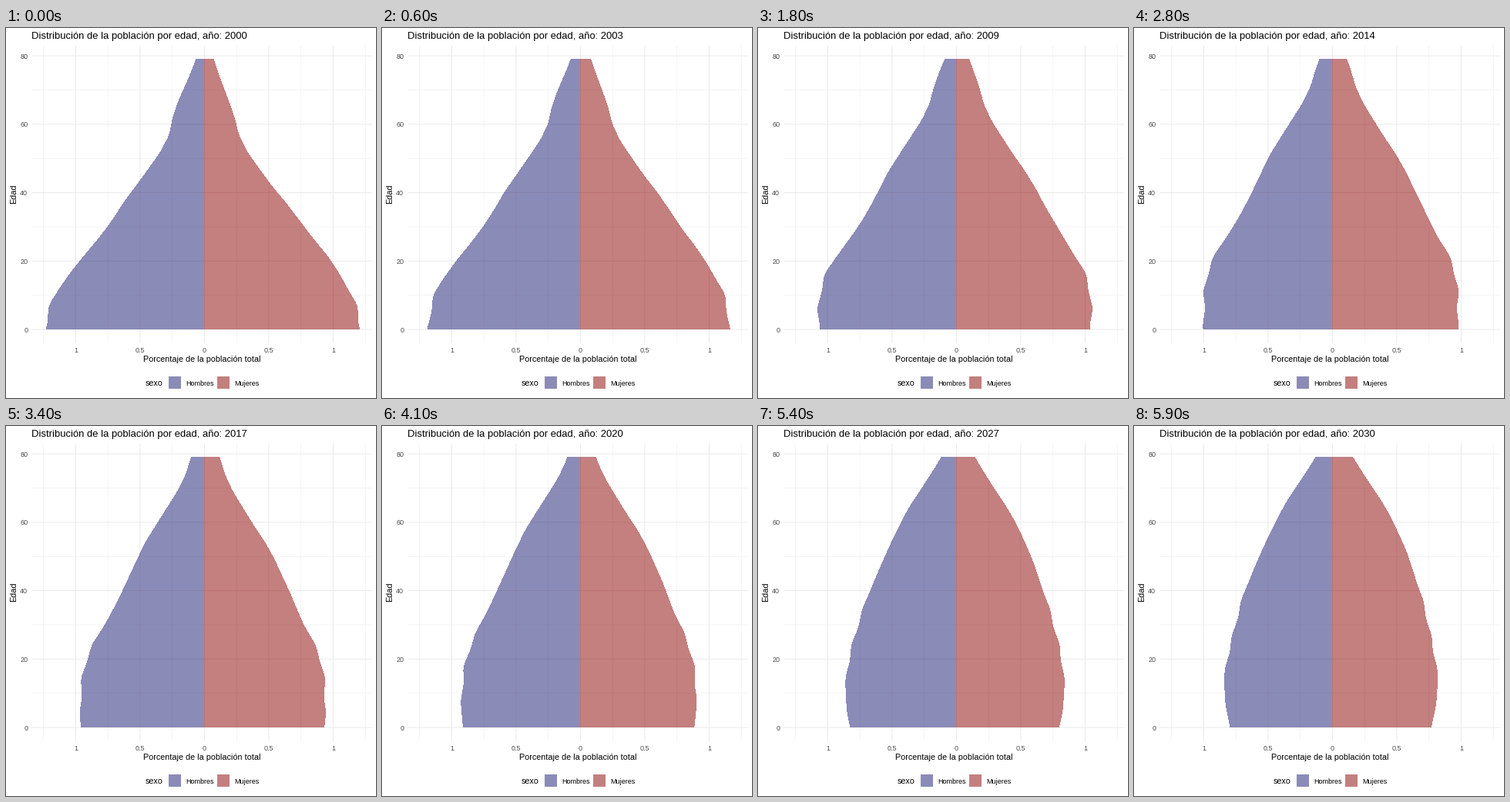
Animation, 480 px wide and 480 px high, one loop 6 s. Source, as a matplotlib script:

```python
import matplotlib.pyplot as plt
import numpy as np
from matplotlib.animation import FuncAnimation
from matplotlib.patches import Rectangle

plt.rcParams["font.family"] = "Liberation Sans"

FRAMES, INTERVAL = 60, 100
START, END = 2000, 2030
LEFT, RIGHT, TOP, BOTTOM = 33.4, 474.5, 22.8, 408.6
X0, UNIT = 257.4, 167
Y0, AGE_PX = 391.1, 4.4375
GRID, TICK = "#EBEBEB", "#4D4D4D"

# Pixel rows of the pyramid and the age at the middle of each.
ROWS = np.arange(40, 392)
AGES = (Y0 - ROWS[:-1] - 0.5) / AGE_PX

# Size at birth of the male cohorts, in pixels, and women per man by birth year.
BIRTHS = np.array([
    (1918, 23.5), (1933, 51), (1938, 57), (1943, 59.5), (1948, 71.5),
    (1963, 125), (1983, 178.5), (1993, 203.5), (1998, 204), (2003, 210),
    (2008, 205), (2013, 208.5), (2023, 202), (2033, 188)]).T
RATIO = np.array([
    (1918, 0.84), (1933, 0.86), (1943, 0.94), (1958, 0.97),
    (1968, 1.018), (1978, 1.018), (1988, 0.985), (2033, 0.965)]).T


def cohort(points, born):
    """Interpolate between key cohorts with slightly rounded corners."""
    return sum(np.interp(born + d, *points) for d in (-1, 0, 1)) / 3


def survival(age, leaving, dying):
    left = leaving / (1 + np.exp((25 - age) / 5.3))
    died = dying * np.exp(0.095 * (age - 62))
    return np.exp(-left - died)


def dilution(t):
    """Shrinking share of a cohort as the total population grows."""
    dt = t - START
    return np.exp(-0.0172 * dt + 0.000165 * dt ** 2)


def edge(t, side):
    born = t - AGES
    width = cohort(BIRTHS, born) * dilution(t)
    if side < 0:
        width *= survival(AGES, 0.17, 0.153)
    else:
        width *= cohort(RATIO, born) * survival(AGES, 0.16, 0.107)
    return np.round(X0 + side * width)


fig = plt.figure(figsize=(480 / 72, 480 / 72), dpi=72, facecolor="white")
ax = fig.add_axes([0, 0, 1, 1])
ax.axis("off")


def rule(xs, ys, width):
    ax.plot(xs, ys, color=GRID, lw=width, solid_capstyle="butt",
            snap=False, zorder=1)


def label(x, y, text, size, color="black", **kw):
    return ax.text(x, y, text, fontsize=size, color=color,
                   va="baseline", zorder=4, **kw)


def column(value, width):
    x = X0 + UNIT * value
    rule([x, x], [TOP, BOTTOM], width)
    return x


def line(age, width):
    y = Y0 - AGE_PX * age
    rule([LEFT, RIGHT], [y, y], width)
    return y


for v in np.arange(-1.25, 1.3, 0.5):
    column(v, 0.53)
for age in range(10, 80, 20):
    line(age, 0.53)
for v in (-1, -0.5, 0, 0.5, 1):
    label(column(v, 1.07), 421, f"{abs(v):g}", 9, TICK, ha="center")
for age in range(0, 81, 20):
    label(28.3, line(age, 1.07) + 3.5, str(age), 9, TICK, ha="right")

flat = dict(alpha=0.5, linewidth=0, snap=False, zorder=3)
halves = []
for side, color, key_x, name in ((-1, "midnightblue", 211, "Hombres"),
                                 (1, "darkred", 274, "Mujeres")):
    half = ax.stairs(edge(START, side), ROWS, baseline=round(X0), fill=True,
                     orientation="horizontal", color=color, **flat)
    halves.append((half, side))
    ax.add_patch(Rectangle((key_x, 452), 16, 16, facecolor=color, **flat))
    label(key_x + 22, 464, name, 9)

title = label(33, 14, "", 13)
label(254, 433, "Porcentaje de la población total", 10.8, ha="center")
label(13, 215.5, "Edad", 10.8, ha="center", rotation=90,
      rotation_mode="anchor")
label(180.5, 464, "sexo", 10.8)
ax.set_xlim(0, 480)
ax.set_ylim(480, 0)


def update(i):
    t = START + (END - START) * i / (FRAMES - 1)
    title.set_text(f"Distribución de la población por edad, año: {int(t + 1e-6)}")
    for half, side in halves:
        half.set_data(values=edge(t, side))
    return [title] + [half for half, _ in halves]


anim = FuncAnimation(fig, update, frames=FRAMES, interval=INTERVAL,
                     init_func=lambda: update(0), repeat=True, repeat_delay=0)
plt.show()
```
